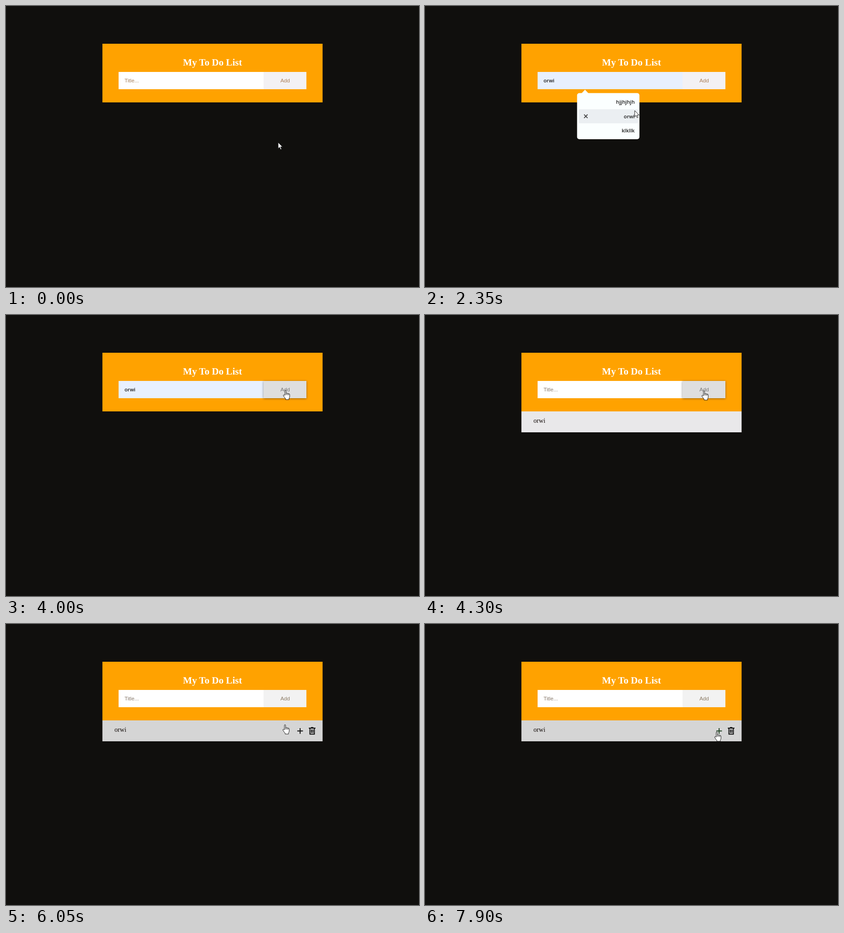
Animation of 906 by 618 pixels, one loop 8 s. Source, as an HTML page:

```html
<!DOCTYPE html>
<html lang="en">
<head>
<meta charset="utf-8">
<title>My To Do List</title>
<style>
  html, body { margin: 0; width: 100%; height: 100%; overflow: hidden; background: #100f0d; }
  svg { display: block; }
  .sans { font: 11.73px "Liberation Sans", Arial, sans-serif; }
  .ui { font: 600 11.2px "Open Sans", "Noto Sans", sans-serif; fill: #1c1c1c; }
  .serif { font: 14.1px "Liberation Serif", "Times New Roman", serif; }
  .head { font: bold 21.1px "Liberation Serif", "Times New Roman", serif; fill: #fff; }
  .mid { text-anchor: middle; }
  .end { text-anchor: end; }
  .line { fill: none; stroke: #0c0c0c; stroke-width: 2; }
  .cur { fill: #fff; stroke: #161616; stroke-linejoin: round; }
</style>
</head>
<body>
<svg width="906" height="618" viewBox="0 0 906 618">
  <rect width="906" height="618" fill="#100f0d"/>
  <rect x="211.5" y="83" width="483" height="129" fill="#ffa200"/>
  <text class="head mid" x="453" y="131">My To Do List</text>

  <rect id="field" x="247" y="145" width="318" height="38"/>
  <text id="hint" class="sans" x="260" y="167.6">Title...</text>
  <text id="value" class="ui" x="260" y="167.6">orwi</text>
  <rect id="caret" y="157" width="1" height="13" fill="#111"/>

  <rect id="btn" x="565" y="145" width="94" height="38"/>
  <text id="add" class="sans mid" x="612.4" y="167.6">Add</text>

  <g id="item">
    <rect id="bar" x="211.5" y="212" width="483" height="46"/>
    <text class="serif" x="238" y="237" fill="#100806">orwi</text>
    <g id="icons">
      <path id="plus" class="line" d="M639 235.3h12.4M645.2 229v12.6"/>
      <path class="line" d="M664.3 229h14.6M669 227.8h5.2M666.7 229v13.2h9.8v-13.2M670 232v7.4M673.3 232v7.4"/>
    </g>
  </g>

  <g id="menu">
    <path d="M343.5 192L351 184l7.5 8z" fill="#fbffff"/>
    <rect x="333.6" y="191.5" width="136.8" height="101.5" rx="5" fill="#fbffff"/>
    <g id="mark">
      <rect id="row" x="337" y="227" width="130" height="31" rx="2" fill="#ebeff2"/>
      <path d="M349 238.7l7.6 7.6m0-7.6l-7.6 7.6" fill="none" stroke="#444" stroke-width="1.9"/>
    </g>
    <text class="ui end" x="460" y="215">hjjhjhjh</text>
    <text class="ui end" x="460" y="246.5">orwi</text>
    <text class="ui end" x="460" y="278">klkllk</text>
  </g>

  <path id="arrow" class="cur" d="M0 0V13.5L3.1 10.7L5.3 15.7L7.5 14.7L5.3 9.9H9.6Z"/>
  <path id="beam" d="M-3-6.5h2m2 0h2M-.5-5.5v11M-3 6.500h2m2 0h2" fill="none" stroke="#222"/>
  <g id="hand">
    <path class="cur" transform="translate(-5.2 0)" d="M4 11.5V1.8Q4 .5 5.2 .5Q6.5 .5 6.5 1.8V7Q8.200 6 9.3 7.4Q11 6.7 12 8Q14.5 7.6 14.5 10V14Q14.5 16.5 13 18.5V21H5.5V19Q4 17.5 1 13Q0 11.500 1 10.8Q2.5 10 4 12ZM6.5 7v4M9.3 7.4v3.8M12 8v3.4"/>
  </g>
</svg>
<script>
const LOOP = 8000, STEP = 50, BLINK = 500;
const OPEN = 1350, PICK = 2750, SUBMIT = 4150;

// pointer glides: start, end, x, y to reach
const home = [597, 300];
const glides = [
  [150, 1000, 488, 167],
  [1400, 1550, 496, 148],
  [1650, 2150, 460, 251],
  [2150, 2350, 460, 230],
  [2650, 3450, 584, 173],
  [3450, 3500, 613, 165],
  [4250, 4650, 587, 185],
  [4800, 5000, 583, 228],
  [5400, 5650, 599, 230],
  [5950, 6050, 612, 221],
  [6050, 6400, 629, 186],
  [6450, 6800, 640, 236],
  [6900, 7550, 674, 235],
  [7650, 7900, 640, 237]
];

const el = {};
document.querySelectorAll('[id]').forEach(n => el[n.id] = n);

const ease = u => u * u * (3 - 2 * u);
const show = (n, on) => n.style.display = on ? '' : 'none';
const mix = (a, b, u) => `rgb(${a.map((v, i) => Math.round(v + (b[i] - v) * u))})`;
const grey = v => [v, v, v];

function pos(t) {
  let [x, y] = home;
  for (const [a, b, tx, ty] of glides) {
    const s = ease(Math.min(1, Math.max(0, (t - a) / (b - a))));
    x += (tx - x) * s;
    y += (ty - y) * s;
  }
  return [x, y];
}

// each shape's own box is its hover zone
const zones = {};
for (const k of ['field', 'btn', 'row', 'bar', 'plus']) zones[k] = el[k].getBBox();

function over(name, t) {
  const [x, y] = pos(t), z = zones[name];
  return x >= z.x && x <= z.x + z.width && y >= z.y && y <= z.y + z.height;
}

// hover amount, averaged over the last `ms`
function glow(name, t, ms) {
  let n = 0;
  for (let i = 0; i < 8; i++) n += over(name, t - i * ms / 8);
  return n / 8;
}

function draw(t) {
  const listed = t >= SUBMIT;
  const menu = t >= OPEN && t < PICK;
  const row = menu && over('row', t);
  const picked = t >= PICK && !listed;
  const filled = row || picked;

  show(el.menu, menu);
  show(el.mark, row);
  show(el.value, filled);
  show(el.hint, !filled);
  el.field.setAttribute('fill', filled ? '#e8f0fe' : '#fff');
  el.hint.setAttribute('fill', listed ? '#87796c' : '#a5805c');

  const lit = Math.floor((t - 300) / BLINK) % 2 === 0;
  show(el.caret, picked ? lit : menu && !row && t < OPEN + BLINK);
  el.caret.setAttribute('x', picked ? 282 : 260);

  const b = glow('btn', t, 200);
  el.btn.setAttribute('fill', mix(listed ? grey(242) : [243, 241, 244], grey(222), b));
  el.btn.style.filter = b ? `drop-shadow(0 1px 2.5px rgba(0,0,0,${0.42 * b}))` : 'none';
  el.add.setAttribute('fill', mix(listed ? [140, 124, 102] : [172, 128, 90], grey(120), b));

  const inItem = listed && over('bar', t);
  show(el.item, listed);
  show(el.icons, inItem);
  el.bar.setAttribute('fill', mix([233, 232, 234], grey(213), glow('bar', t, 150)));
  el.plus.style.stroke = mix(grey(12), [36, 80, 40], glow('plus', t, 150));

  const kind = inItem || over('btn', t) ? 'hand' : over('field', t) ? 'beam' : 'arrow';
  for (const k of ['arrow', 'beam', 'hand']) show(el[k], k === kind);
  el[kind].setAttribute('transform', `translate(${pos(t).map(Math.round)})`);
}

const start = performance.now();
function tick() {
  const t = (performance.now() - start) % LOOP;
  draw(Math.floor(t / STEP) * STEP);
  requestAnimationFrame(tick);
}
tick();
</script>
</body>
</html>
```
